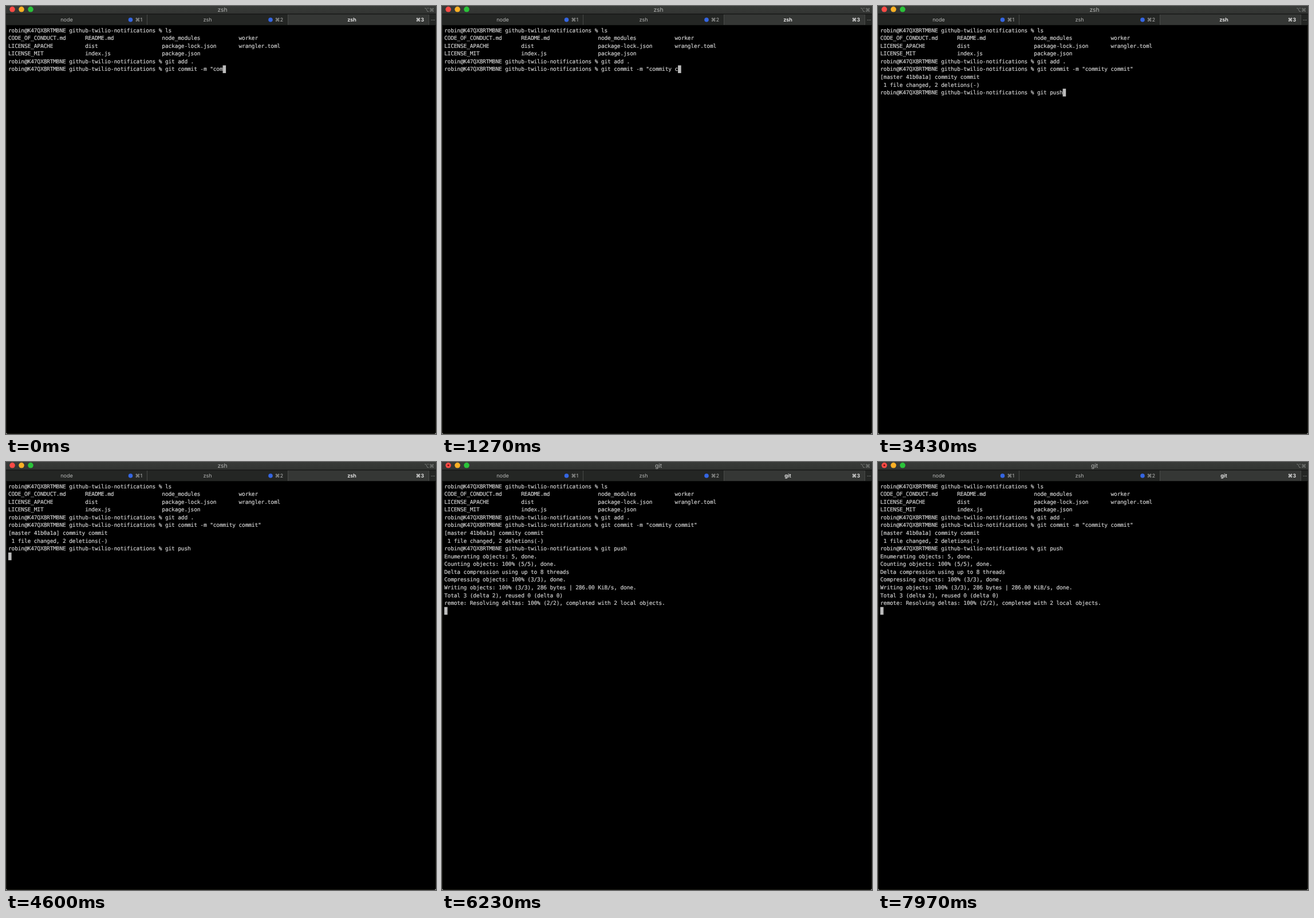
Write an HTML page that moves like this. It is 751 by 746 pixels and loops after 8000 ms.

```html
<!DOCTYPE html>
<html lang="en">
<head>
<meta charset="utf-8">
<title>Terminal</title>
<style>
  html, body { margin: 0; width: 100%; height: 100%; overflow: hidden; background: #000; }
  svg { display: block; width: 751px; height: 746px; }
  text { white-space: pre; text-rendering: geometricPrecision; }
  .ui { font-family: Inter, sans-serif; font-size: 9.1px; fill: #b4b5b4; }
  .mid { text-anchor: middle; }
  .key { font-family: Inter, "DejaVu Sans", sans-serif; font-size: 8.8px; text-anchor: end; }
  .on { font-weight: 600; fill: #f4f4f4; }
  .title { font-size: 10.3px; }
  .term {
    font-family: "DejaVu Sans Mono", monospace; font-size: 9.58px; letter-spacing: -.177px;
    fill: #d2d2d2; stroke: #d2d2d2; stroke-width: .18px;
  }
</style>
</head>
<body>
<svg viewBox="0 0 751 746">
  <defs>
    <linearGradient id="bar" x2="0" y2="1">
      <stop stop-color="#383a38"/><stop offset="1" stop-color="#323432"/>
    </linearGradient>
  </defs>
  <rect width="751" height="746"/>
  <path d="M.5 33V745.5H750.5V33" fill="none" stroke="#20211a"/>
  <path d="M0 743V746H3Q0 746 0 743M751 743V746H748Q751 746 751 743" fill="#ddd"/>
  <rect width="751" height="14" fill="url(#bar)"/>
  <rect y="14" width="751" height="19" fill="#242624"/>
  <rect x="492" y="14" width="246" height="19" fill="#353735"/>
  <path d="M0 14H751M0 33.5H751" stroke="#0c0d0c"/>
  <path d="M246.5 15V33M492.5 15V33M738.5 15V33" stroke="#484a48"/>

  <circle cx="11" cy="5.8" r="4.8" fill="#fc4b46"/>
  <circle id="busy" cx="11" cy="5.8" r="1.6" fill="#7c0d0a"/>
  <circle cx="27" cy="5.8" r="4.8" fill="#fdb125"/>
  <circle cx="43" cy="5.8" r="4.8" fill="#2ac33a"/>
  <text id="title" class="ui mid title" x="378" y="9.7"></text>
  <text class="ui key" x="748" y="9.5" style="fill:#8a8c8a">⌥⌘</text>

  <text class="ui mid" x="106" y="27.3">node</text>
  <circle cx="217.5" cy="24" r="3.8" fill="#3566e2"/>
  <text class="ui key" x="238" y="27.3">⌘1</text>
  <text class="ui mid" x="352" y="27.3">zsh</text>
  <circle cx="462" cy="24" r="3.8" fill="#3566e2"/>
  <text class="ui key" x="484" y="27.3">⌘2</text>
  <text id="tab" class="ui mid on" x="604" y="27.3"></text>
  <text class="ui key on" x="730" y="27.3">⌘3</text>
  <path d="M742.5 24.5H749" stroke="#777977" stroke-dasharray="1.5 1"/>

  <rect id="cursor" width="5.6" height="13.5" fill="#bcbcbc"/>
  <g id="screen" class="term"></g>
</svg>
<script>
const LOOP = 8000, COL = 5.59, ROW = 13.57, LEFT = 4, TOP = 35.6, BASE = 10;
const GIT_START = 5150;
const $ = id => document.getElementById(id);
const prompt = 'robin@K47QX8RTMBNE github-twilio-notifications % ';
const columns = (...names) => names.map(n => n.padEnd(24)).join('').trimEnd();

const opening = [
  prompt + 'ls',
  columns('CODE_OF_CONDUCT.md', 'README.md', 'node_modules', 'worker'),
  columns('LICENSE_APACHE', 'dist', 'package-lock.json', 'wrangler.toml'),
  columns('LICENSE_MIT', 'index.js', 'package.json'),
  prompt + 'git add .',
  prompt + 'git commit -m "com'
].join('\n');

// Keystrokes at an even pace from start, one every step ms
const typed = (start, step, keys) => [...keys].map((key, i) => [start + i * step, key]);

const events = [
  ...typed(130, 125, 'miti'),
  [750, '\b'],
  ...typed(900, 160, 'y c'),
  ...typed(1340, 115, 'ommit"'),
  [2130, '\n'],
  [2230, '[master 41b0a1a] commity commit\n 1 file changed, 2 deletions(-)\n' + prompt],
  ...typed(2630, 60, 'gi'),
  ...typed(2800, 110, 't push'),
  [3850, '\n'],
  [5200, 'Enumerating objects: 5, done.\n' +
    'Counting objects: 100% (5/5), done.\n' +
    'Delta compression using up to 8 threads\n' +
    'Compressing objects: 100% (3/3), done.\n'],
  [5300, 'Writing objects: 100% (3/3), 286 bytes | 286.00 KiB/s, done.\n' +
    'Total 3 (delta 2), reused 0 (delta 0)\n'],
  [5600, 'remote: Resolving deltas: 100% (2/2), completed with 2 local objects.\n']
];

const apply = (text, key) => key === '\b' ? text.slice(0, -1) : text + key;
const rows = [];

function showRow(i, line) {
  if (!rows[i]) {
    rows[i] = document.createElementNS('http://www.w3.org/2000/svg', 'text');
    rows[i].setAttribute('x', LEFT);
    rows[i].setAttribute('y', TOP + BASE + i * ROW);
    $('screen').append(rows[i]);
  }
  if (rows[i].textContent !== line) rows[i].textContent = line;
}

function draw() {
  const t = performance.now() % LOOP;
  const text = events.reduce((s, [at, key]) => at <= t ? apply(s, key) : s, opening);
  const lines = text.split('\n');
  const last = lines.length - 1;
  for (let i = 0; i < Math.max(lines.length, rows.length); i++) showRow(i, lines[i] || '');
  $('cursor').setAttribute('x', LEFT + lines[last].length * COL);
  $('cursor').setAttribute('y', TOP + last * ROW);

  const running = t >= GIT_START;
  $('title').textContent = $('tab').textContent = running ? 'git' : 'zsh';
  $('busy').style.visibility = running ? 'visible' : 'hidden';
  requestAnimationFrame(draw);
}
draw();
</script>
</body>
</html>
```
